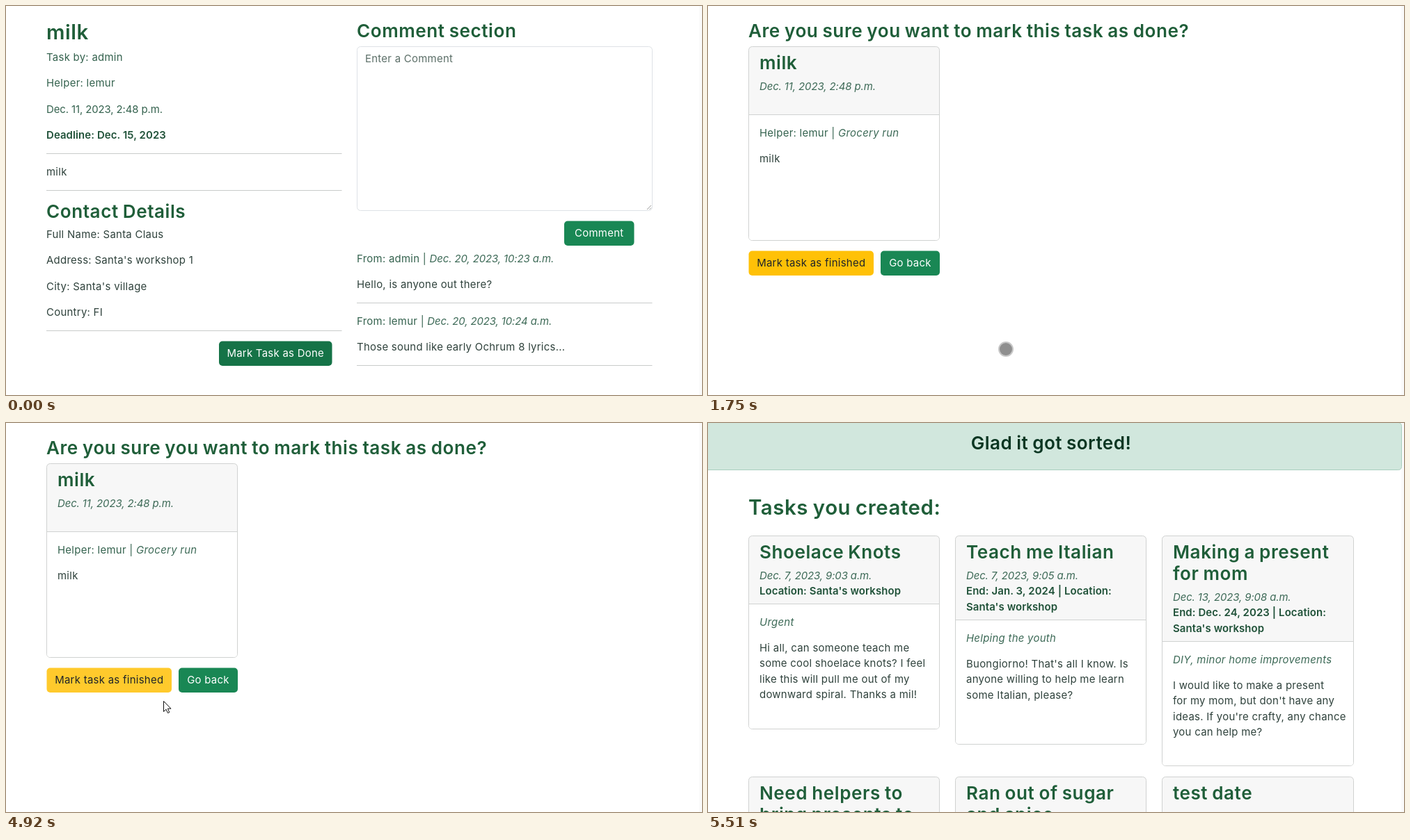
These frames come from a looping animation (1000x560 px, 6170 ms). An HTML page:

```html
<!DOCTYPE html>
<html lang="en">
<head>
<meta charset="utf-8">
<title>Task board</title>
<style>
html, body { margin: 0; width: 100%; height: 100%; overflow: hidden; background: #fff; }
svg { display: block; width: 100vw; height: 100vh; }
text {
  font: 400 14.93px Inter, "Open Sans", sans-serif;
  letter-spacing: .28px;
  font-optical-sizing: none;
  fill: #34624e;
}
.dark { fill: #2f423c; }
.hint { fill: #5c6f68; }
.light { fill: #fff; }
.black { fill: #212529; }
.italic { font-style: italic; fill: #3d6a57; }
.date { letter-spacing: -.1px; }
.bold { font-weight: 600; letter-spacing: .1px; fill: #1f5138; }
.h2, .h3 { font-weight: 600; font-size: 26.1px; letter-spacing: .55px; word-spacing: -1px; fill: #1f5e39; }
.h2 { font-size: 29.4px; }
.banner { letter-spacing: .45px; fill: #0a3622; }
.mid { text-anchor: middle; }
</style>
</head>
<body>
<svg id="stage" viewBox="0 0 1000 560"></svg>
<script>
const LOOP = 6170;
const GREEN = "#198754";
const BORDER = "#d0d2d1";

const text = (x, y, str, cls = "") => `<text x="${x}" y="${y}" class="${cls}">${str}</text>`;
const lines = (x, y, step, list, cls) => list.map((s, i) => text(x, y + i * step, s, cls)).join("");
const italic = (str, cls = "") => `<tspan class="italic ${cls}">${str}</tspan>`;
const rule = (x1, x2, y, color = "#c8cbca") => `<path d="M${x1} ${y}H${x2}" stroke="${color}"/>`;
const box = (x, y, w, h, fill, stroke = "none", id = "") =>
  `<rect id="${id}" x="${x}" y="${y}" width="${w}" height="${h}" rx="5" fill="${fill}" stroke="${stroke}"/>`;
const button = (x, y, w, label, fill, cls = "light", id = "") =>
  box(x, y, w, 35.5, fill, "none", id) + text(x + w / 2, y + 22.5, label, cls + " mid");
const group = (id, content) => `<g id="${id}" visibility="hidden">${content}</g>`;

function card(x, top, bottom, { titles, date, notes, tag, body }) {
  const left = x + 15.5, width = x > 600 ? 275 : 274;
  const dateY = top + 32 + (titles.length - 1) * 31 + 30;
  const split = dateY + notes.length * 22.4 + 14;
  const edge = Math.floor(split) + .5;
  const inner = edge < bottom
    ? `<path d="M${x + .5} ${edge}h${width - 1}V${bottom - 5}q0 4.5 -4.5 4.5H${x + 5}q-4.5 0 -4.5 -4.5Z" fill="#fff"/>`
      + rule(x, x + width, edge, BORDER)
      + text(left, edge + 31, tag)
      + lines(left, edge + 68.3, 22.4, body, "dark")
    : "";
  return box(x, top, width, bottom - top, "#f7f7f7", BORDER) + inner
    + lines(left, top + 32, 31, titles, "h3")
    + text(left, dateY, date, "italic date")
    + lines(left, dateY + 22.6, 22.4, notes, "bold");
}

const taskPage =
  text(58, 48, "milk", "h2")
  + lines(58, 79, 37.3, ["Task by: admin", "Helper: lemur"])
  + text(58, 153.6, "Dec. 11, 2023, 2:48 p.m.", "date")
  + text(58, 191, "Deadline: Dec. 15, 2023", "bold")
  + rule(58, 482.5, 212.5) + text(58, 244, "milk", "dark") + rule(58, 482.5, 265.5)
  + text(58, 304.5, "Contact Details", "h3")
  + lines(58, 334, 37.3, ["Full Name: Santa Claus", "Address: Santa's workshop 1",
    "City: Santa's village", "Country: FI"], "dark")
  + rule(58, 482.5, 467.5)
  + button(306, 482.5, 162.5, "Mark Task as Done", "#157347")
  + text(504, 44.5, "Comment section", "h3")
  + box(504.5, 58.5, 424, 236, "#fff", "#dee2e6")
  + `<path d="M921 293l6-6M924.500 293l2.500-2.500" stroke="#888" stroke-width=".8"/>`
  + text(516, 81, "Enter a Comment", "hint")
  + button(802, 309.5, 100.5, "Comment", GREEN)
  + text(504, 368.5, "From: admin | " + italic("Dec. 20, 2023, 10:23 a.m.", "date"))
  + text(504, 405.5, "Hello, is anyone out there?", "dark")
  + rule(504, 928.5, 427.5)
  + text(504, 458.5, "From: lemur | " + italic("Dec. 20, 2023, 10:24 a.m.", "date"))
  + text(504, 496, "Those sound like early Ochrum 8 lyrics...", "dark")
  + rule(504, 928.5, 517.5);

const confirmPage =
  text(58, 44.5, "Are you sure you want to mark this task as done?", "h3")
  + card(58.5, 58.5, 337.5, {
    titles: ["milk"], date: "Dec. 11, 2023, 2:48 p.m.", notes: [""],
    tag: "Helper: lemur | " + italic("Grocery run"), body: ["milk"]
  })
  + button(58.5, 352.5, 179.5, "Mark task as finished", "#ffc107", "black", "finish")
  + button(248, 352.5, 85, "Go back", GREEN);

const present = {
  titles: ["Making a present", "for mom"], date: "Dec. 13, 2023, 9:08 a.m.",
  notes: ["End: Dec. 24, 2023 | Location:", "Santa's workshop"],
  tag: italic("DIY, minor home improvements"),
  body: ["I would like to make a present", "for my mom, but don't have any",
    "ideas. If you're crafty, any chance", "you can help me?"]
};
const upcoming = titles => ({ titles, date: "", notes: [""] });

const listPage =
  `<path d="M-1 -.5H991.500q5 0 5 5V62.500q0 5 -5 5H-1Z" fill="#d1e7dd" stroke="#a9cfbf"/>`
  + text(493, 38, "Glad it got sorted!", "h3 banner mid")
  + text(58, 132, "Tasks you created:", "h2")
  + card(58.5, 162.5, 440.5, {
    titles: ["Shoelace Knots"], date: "Dec. 7, 2023, 9:03 a.m.",
    notes: ["Location: Santa's workshop"], tag: italic("Urgent"),
    body: ["Hi all, can someone teach me", "some cool shoelace knots? I feel",
      "like this will pull me out of my", "downward spiral. Thanks a mil!"]
  })
  + card(355.5, 162.5, 462.5, {
    titles: ["Teach me Italian"], date: "Dec. 7, 2023, 9:05 a.m.",
    notes: ["End: Jan. 3, 2024 | Location:", "Santa's workshop"], tag: italic("Helping the youth"),
    body: ["Buongiorno! That's all I know. Is", "anyone willing to help me learn", "some Italian, please?"]
  });

const partial = card(652.5, 162.5, 269.5, { ...present, notes: [] }) + rule(655, 925, 269.5, "#b4b7b5");
const complete =
  card(652.5, 162.5, 493.5, present)
  + card(58.5, 509.5, 600, upcoming(["Need helpers to", "bring presents to"]))
  + card(355.5, 509.5, 600, upcoming(["Ran out of sugar", "and spice"]))
  + card(652.5, 509.5, 600, upcoming(["test date"]));

document.getElementById("stage").innerHTML =
  `<rect width="1000" height="560" fill="#fff"/><rect x="996" width="4" height="560" fill="#fafafa"/>`
  + group("task", taskPage) + group("confirm", confirmPage) + group("list", listPage)
  + group("partial", partial) + group("complete", complete)
  + group("touch", `<circle r="11" fill="#000" fill-opacity=".22"/><circle r="9" fill="#000" fill-opacity=".28"/>`)
  + group("arrow", `<path d="M.5 .5V15.500L4 12.200L6.500 17.500L8.800 16.500L6.400 11.200H11Z" fill="#fff" stroke="#111"/>`);

// Pointer positions advance in discrete steps, then hold.
const moves = [
  { start: 130, step: 75, shape: "touch", path: [[671, 521], [640, 512], [590, 502], [530, 494], [490, 489],
    [460, 486], [445, 485], [436, 484], [433, 484]] },
  { start: 800, step: 68, shape: "touch", path: [[433, 486], [433, 489], [434, 493], [434, 496], [435, 499],
    [435, 500], [435, 501]] },
  { start: 1750, step: 70, shape: "touch", path: [[428, 494], [408, 477], [375, 460], [305, 435], [262, 414],
    [240, 398], [228, 388], [223, 383], [221, 382]] },
  { start: 4920, step: 70, shape: "arrow", path: [[226, 400], [335, 540]] },
  { start: 5060, step: 70, shape: "none", path: [[0, 0]] }
];

const el = id => document.getElementById(id);
const show = (id, on) => el(id).setAttribute("visibility", on ? "visible" : "hidden");

function render(t) {
  show("task", t < 1280);
  show("confirm", t >= 1280 && t < 5450);
  show("list", t >= 5450);
  show("partial", t >= 5450 && t < 5510);
  show("complete", t >= 5510);

  const glow = Math.min(1, Math.max(0, (t - 2310) / 490));
  el("finish").setAttribute("fill", `rgb(255,${193 + 9 * glow},${7 + 37 * glow})`);

  const move = moves.filter(m => t >= m.start).pop();
  for (const shape of ["touch", "arrow"]) show(shape, move && move.shape === shape);
  if (!move || move.shape === "none") return;
  const index = Math.min(move.path.length - 1, Math.floor((t - move.start) / move.step));
  el(move.shape).setAttribute("transform", `translate(${move.path[index]})`);
}

const begin = performance.now();
function tick() {
  render((performance.now() - begin) % LOOP);
  requestAnimationFrame(tick);
}
tick();
</script>
</body>
</html>
```
